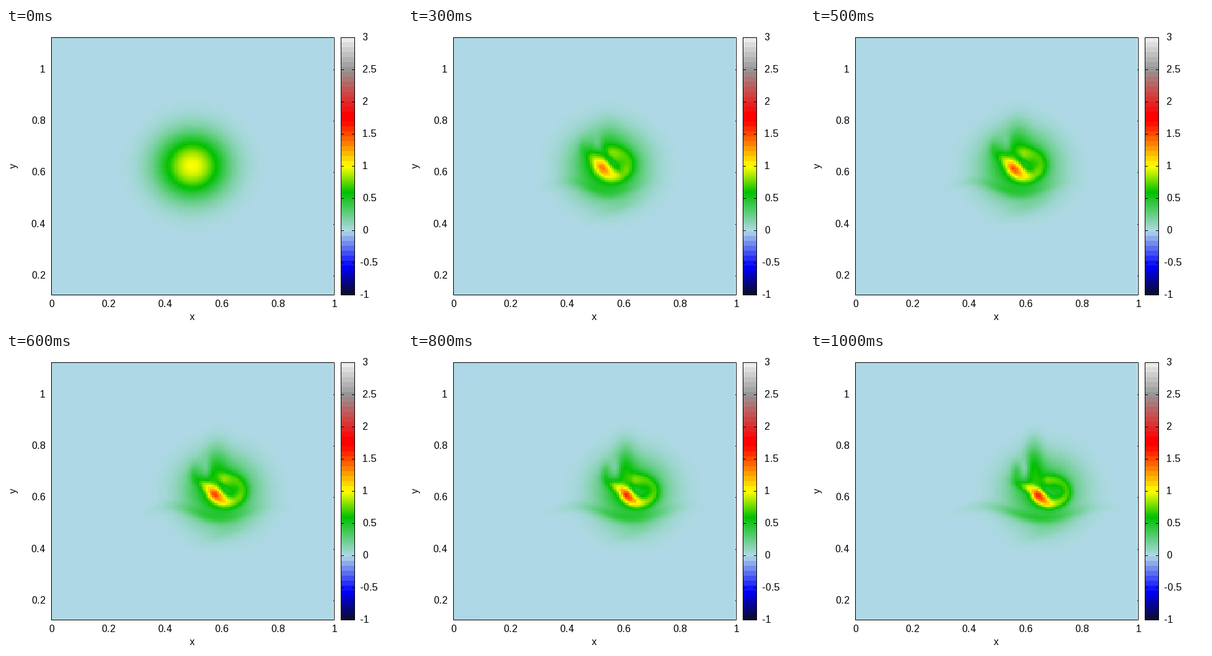
These frames come from a looping animation (640x480 px, 1.1 s). A matplotlib script:

```python
import numpy as np
import matplotlib.pyplot as plt
from matplotlib.animation import FuncAnimation
from matplotlib.colors import LinearSegmentedColormap, ListedColormap

W, H, DPI = 640, 480, 100
FRAMES, STEP_MS = 11, 100
LEFT, RIGHT, TOP, BOTTOM = 73, 530, 15, 431
BAR_L, BAR_R = 541, 563
LO, HI = -1, 3
CELLS = 128
PX = 72 / DPI

plt.rcParams["font.family"] = "Liberation Sans"
plt.rcParams["text.hinting_factor"] = 1


def make_palette(n=416):
    stops = [(-1, "#0c0c24"), (-0.55, "#0000ff"), (0, "#b0d9e7"),
             (0.6, "#00c000"), (1, "#ffff00"), (1.7, "#ff0000"),
             (1.8, "#ff0000"), (2.5, "#969696"), (3, "#f2f2f2")]
    ramp = LinearSegmentedColormap.from_list(
        "ramp", [((v - LO) / (HI - LO), c) for v, c in stops], N=2048)
    v = np.linspace(LO, HI, n)
    banded = (np.floor(v * 13) + 0.5) / 13
    v = np.where((v < -0.01) | (v > 1), banded, v)
    return ListedColormap(ramp((v - LO) / (HI - LO)))


# Cell centres in stage pixels
mid = (np.arange(CELLS) + 0.5) / CELLS
X, Y = np.meshgrid(LEFT + 1 + (RIGHT - LEFT - 2) * mid, TOP + (BOTTOM - TOP) * mid)


def bell(d, width):
    return np.exp(-(d / width) ** 2 / 2)


def spot(x, y, sx, sy, angle=0.0):
    """Gaussian spot, its long axis turned by angle."""
    c, s = np.cos(angle), np.sin(angle)
    dx, dy = X - x, Y - y
    return bell(c * dx + s * dy, sx) * bell(c * dy - s * dx, sy)


def hook(x, y, rx, ry, width):
    """Open elliptic ridge, brightest at its lower left end."""
    out = np.zeros_like(X)
    for u in np.linspace(0, 1, 50):
        a = np.radians(155 - 255 * u)
        ridge = spot(x + rx * np.cos(a), y + ry * np.sin(a), width, width)
        out = np.maximum(out, (1 - 0.5 * u) * ridge)
    return out


def wing(cx, crest, reach):
    """Wavy streak below the blob, its crest to the left."""
    dx = X - cx
    wave = 258 - 10 * np.cos(np.pi * (dx - crest) / (5 - crest))
    return bell(Y - wave, 6) * bell(dx + 15, reach)


def field(t):
    onset = min(t / 2, 1)
    p = max(t - 2, 0) / 8

    def go(a, b):
        return a + (b - a) * p

    cx = 301 + 7.3 * t
    amp = 1 - 0.22 * onset - 0.17 * p
    blob = amp * spot(cx + 0.3 * t, 223, 38.5, 35.5)
    detail = (
        go(0.28, 0.5) * hook(cx + go(12, 16), go(219, 224), go(23, 26), 20, go(8, 6))
        + go(0.22, 0.35) * spot(cx + go(-19, -24), go(214, 217), 15, go(7, 5), go(0.9, 0.4))
        + go(0.15, 0.55) * spot(cx + go(-9, -2), go(227, 231), 12, go(7, 5.5), 0.72)
        - go(0.28, 0.14) * spot(cx + go(6, 10), go(215, 222), go(17, 10), 4, go(0.9, 0.65))
        + go(0.05, 0.32) * spot(cx + go(4, -12), go(180, 175), go(15, 10), 24)
        + go(0.08, 0.2) * spot(cx - 41, 194, 5, 11)
        - go(0.14, 0.2) * spot(cx + go(-15, -26), 188, 5, 11)
        + go(0.1, 0.2) * wing(cx, go(-62, -95), go(42, 60))
        + 0.05 * spot(cx + go(20, 0), 290, 26, 7, -0.35)
    )
    return np.maximum(blob + onset * detail, 0)


fig = plt.figure(figsize=(W / DPI, H / DPI), dpi=DPI, facecolor="white")
ax = fig.add_axes([0, 0, 1, 1])
ax.axis("off")

style = dict(cmap=make_palette(), vmin=LO, vmax=HI,
             interpolation="nearest", aspect="auto")
heat = ax.imshow(field(0), extent=(LEFT + 1, RIGHT - 1, BOTTOM, TOP), **style)
ax.imshow(np.linspace(HI, LO, 416)[:, None],
          extent=(BAR_L, BAR_R + 1, BOTTOM + 1, TOP), **style)
ax.set_xlim(0, W)
ax.set_ylim(H, 0)


def line(xs, ys):
    """One-pixel line through pixel centres."""
    ax.plot(np.array(xs) + 0.5, np.array(ys) + 0.5, color="black", lw=PX,
            snap=False, solid_capstyle="projecting", solid_joinstyle="miter")


def label(x, y, text, **kw):
    ax.text(x, y, text, fontsize=16 * PX, color="black", **kw)


def box(l, r):
    line([l, r, r, l, l], [TOP, TOP, BOTTOM, BOTTOM, TOP])


box(LEFT, RIGHT)
box(BAR_L, BAR_R)

for k in range(6):
    label(LEFT + 1.3 + k * (RIGHT - LEFT) / 5, 451, f"{k / 5:g}", ha="center")

for k in range(1, 6):
    y = round(BOTTOM - (k / 5 - 0.125) * (BOTTOM - TOP))
    line([RIGHT - 1, RIGHT], [y, y])
    label(64, y + 5, f"{k / 5:g}", ha="right")

for k in range(9):
    value = LO + k / 2
    y = BOTTOM - k * (BOTTOM - TOP) // 8
    line([BAR_L, BAR_L + 4], [y, y])
    line([BAR_R - 4, BAR_R], [y, y])
    label(572 if value < 0 else 576, y + 5, f"{value:g}", ha="left")

label(301, 472, "x", ha="center")
label(19.5, 223, "y", ha="right", va="center", rotation=90)


def update(i):
    heat.set_data(field(i))
    return [heat]


anim = FuncAnimation(fig, update, frames=FRAMES, interval=STEP_MS,
                     repeat=True, repeat_delay=0, blit=False)
plt.show()
```
